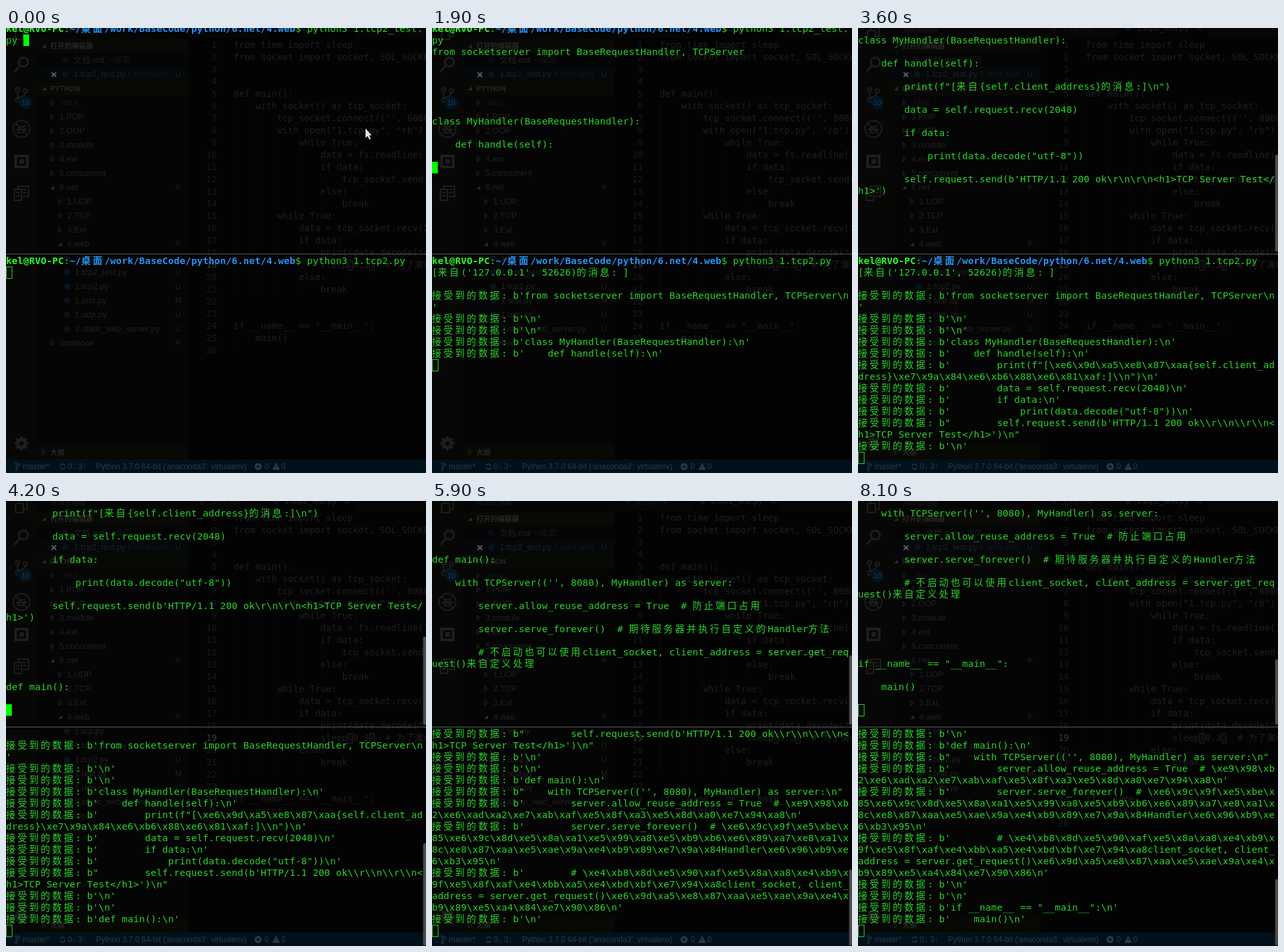
Animation, 653 px wide and 692 px high, one loop 8.4 s. Source, as an HTML page with a canvas:

```html
<!DOCTYPE html>
<html lang="zh">
<head>
<meta charset="utf-8">
<title>TCP server test</title>
<style>
html, body { margin: 0; width: 653px; height: 692px; overflow: hidden; background: #000; }
canvas { display: block; }
</style>
</head>
<body>
<canvas id="stage" width="653" height="692"></canvas>
<script>
const W = 653, H = 692, LOOP = 8400, COLS = 72, CELL = 9, LINE = 18;
const CJK = '"Noto Sans CJK SC", "Noto Sans CJK", sans-serif';
const MONO = '"DejaVu Sans Mono", ' + CJK;
const SANS = '"Liberation Sans", ' + CJK;
const SIZE = '14.67px ';  // 11pt
const GREEN = '#2ad42a', BRIGHT = '#28ff28', BLUE = '#2892f8';
const PROMPT = 'kel@RVO-PC:~/桌面/work/BaseCode/python/6.net/4.web$ ';

// Lines sent over the socket, and when each one shows up
const FILE = String.raw`from socketserver import BaseRequestHandler, TCPServer


class MyHandler(BaseRequestHandler):
    def handle(self):
        print(f"[来自{self.client_address}的消息:]\n")
        data = self.request.recv(2048)
        if data:
            print(data.decode("utf-8"))
        self.request.send(b'HTTP/1.1 200 ok\r\n\r\n<h1>TCP Server Test</h1>')


def main():
    with TCPServer(('', 8080), MyHandler) as server:
        server.allow_reuse_address = True  # 防止端口占用
        server.serve_forever()  # 期待服务器并执行自定义的Handler方法
        # 不启动也可以使用client_socket, client_address = server.get_request()来自定义处理


if __name__ == "__main__":
    main()`.split('\n');
const TIMES = [700, 800, 1200, 1400, 1900, 2300, 2400, 2600, 3200, 3400, 3600,
  3800, 4200, 4400, 4700, 5300, 5300, 5900, 6000, 6400, 6900];

// Scrollbar tops: [time, y]
const TOP_BAR = [[2900, 180], [3200, 186], [3400, 192], [3600, 197], [3800, 204], [4200, 211],
  [4400, 217], [4700, 223], [5300, 232], [5600, 240], [6200, 243], [6900, 246]];
const LOW_BAR = [[3900, 525], [4200, 532], [4400, 540], [4700, 548], [5300, 560], [5600, 573], [6200, 588]];

const CODE = `from time import sleep
from socket import socket, SOL_SOCKET


def main():
    with socket() as tcp_socket:
        tcp_socket.connect(('', 8080))
        with open("1.tcp.py", "rb") as fs:
            while True:
                data = fs.readline()
                if data:
                    tcp_socket.send(data)
                else:
                    break
        while True:
            data = tcp_socket.recv(2048)
            if data:
                print(data.decode("utf-8"))
                sleep(0.3)  # 为了演示
            else:
                break


if __name__ == "__main__":
    main()
`.split('\n');

const canvas = document.getElementById('stage');
const isWide = ch => /[\u2e80-\uffff]/.test(ch);

function wrap(text) {
  const rows = [''];
  let col = 0;
  for (const ch of text) {
    const w = isWide(ch) ? 2 : 1;
    if (col + w > COLS) { rows.push(''); col = 0; }
    rows[rows.length - 1] += ch;
    col += w;
  }
  return rows;
}

// Python's repr() of a line as bytes
function bytesRepr(line) {
  const quote = line.includes("'") && !line.includes('"') ? '"' : "'";
  const body = [...new TextEncoder().encode(line)].map(b =>
    b > 126 ? '\\x' + b.toString(16) : b === 92 ? '\\\\' : String.fromCharCode(b)).join('');
  return 'b' + quote + body + '\\n' + quote;
}

function drawRows(g, rows, top) {
  rows.forEach((row, r) => {
    const prompt = row.startsWith(PROMPT);
    let col = 0;
    for (const ch of row) {
      const wide = isWide(ch), user = prompt && col < 10, path = prompt && col > 10 && col < 50;
      g.font = (user || path ? 'bold ' : '') + SIZE + (wide ? CJK : MONO);
      g.fillStyle = user ? BRIGHT : path ? BLUE : GREEN;
      if (ch !== ' ') g.fillText(ch, col * CELL, top + r * LINE + 14);
      col += wide ? 2 : 1;
    }
  });
}

function drawCursor(g, x, y, solid) {
  if (solid) {
    g.fillStyle = '#00ff00';
    g.fillRect(x, y, CELL, LINE);
  } else {
    g.strokeStyle = GREEN;
    g.lineWidth = 1;
    g.strokeRect(x + .5, y + .5, CELL, LINE);
  }
}

function drawBar(g, keys, t, bottom) {
  const key = keys.filter(k => k[0] <= t).pop();
  if (!key) return;
  g.fillStyle = '#4c4c4c';
  g.beginPath();
  g.roundRect(648.5, key[1], 4.5, bottom - key[1], 2);
  g.fill();
}

// Dim editor window showing through the terminal
function makeBackdrop() {
  const layer = document.createElement('canvas');
  layer.width = W;
  layer.height = H;
  const g = layer.getContext('2d');
  const box = (c, x, y, w, h) => { g.fillStyle = c; g.fillRect(x, y, w, h); };
  const text = (s, x, y, c = '#212121', font = '13px ' + SANS) => {
    g.font = font;
    g.fillStyle = c;
    g.fillText(s, x, y);
  };
  const dot = (x, y, r, c) => { g.fillStyle = c; g.beginPath(); g.arc(x, y, r, 0, 7); g.fill(); };
  const line = (...p) => {
    g.beginPath();
    for (let i = 0; i < p.length; i += 2) g.lineTo(p[i], p[i + 1]);
    g.stroke();
  };
  const ring = (x, y, r) => { g.beginPath(); g.arc(x, y, r, 0, 7); g.stroke(); };
  const arrow = (x, y, open) => {
    g.beginPath();
    if (open) { g.moveTo(x + 3, y - 3); g.lineTo(x + 3, y + 3); g.lineTo(x - 3, y + 3); }
    else { g.moveTo(x - 2, y - 4); g.lineTo(x + 2.5, y); g.lineTo(x - 2, y + 4); }
    g.closePath();
    g.lineWidth = 1;
    g.strokeStyle = g.fillStyle = '#2a2a2a';
    open ? g.fill() : g.stroke();
  };

  box('#030303', 0, 0, W, H);
  box('#070705', 0, 0, 49, 671);
  box('#040504', 49, 0, 235, 671);
  box('#060606', 284, 0, W, 15);
  box('#030303', 404, 0, 140, 15);
  for (const y of [17, 83, 649]) box('#080804', 49, y, 235, 22);
  box('#04080a', 49, 61, 235, 22);
  box('#00111c', 0, 671, W, 21);

  // Activity bar
  const glyph = '#1e1e1c';
  g.strokeStyle = glyph;
  g.lineWidth = 2;
  g.strokeRect(15, 4, 12, 14);
  line(20, 3, 20, -2, 33, -2, 33, 13, 27, 13);
  g.lineWidth = 3;
  ring(27, 53, 7);
  line(22, 58, 13, 68);
  g.lineWidth = 2;
  ring(18, 96, 3); ring(30, 98, 3); ring(18, 112, 3);
  line(18, 99, 18, 109);
  line(30, 101, 28, 105, 18, 109);
  ring(24, 157, 13);
  ring(24, 158, 5);
  line(15, 148, 33, 166);
  line(15, 158, 33, 158);
  line(18, 164, 21, 161);
  line(27, 154, 30, 151);
  g.lineWidth = 4;
  g.strokeRect(15, 199, 18, 17);
  box(glyph, 21, 204, 7, 7);
  g.lineWidth = 2;
  g.strokeRect(13, 251, 11, 17);
  line(19, 250, 19, 246, 35, 246, 35, 262, 26, 262);
  line(16, 256, 21, 256);
  line(16, 261, 21, 261);
  line(26, 251, 32, 251);
  line(26, 256, 32, 256);
  dot(30, 116, 10.5, '#001422');
  text('10', 24, 120, '#2a3a46', '11px ' + SANS);
  g.lineWidth = 5;
  ring(24, 646, 6);
  g.lineWidth = 4;
  for (let i = 0; i < 8; i++) {
    const c = Math.cos(i * Math.PI / 4), s = Math.sin(i * Math.PI / 4);
    line(24 + 7 * c, 646 + 7 * s, 24 + 11 * c, 646 + 11 * s);
  }

  // Sidebar
  const head = 'bold 11px ' + SANS, small = '12px ' + SANS, icon = '#08131d';
  text('资源管理器', 69, 6, '#1a1a1a', '11px ' + SANS);
  [['打开的编辑器', 28, 1], ['PYTHON', 94, 1], ['大纲', 660, 0]].forEach(([s, y, open]) => {
    arrow(59, y, open);
    text(s, 69, y + 4, '#272727', head);
  });
  text('文档.md', 105, 54);
  text('~/桌面', 159, 54, '#161616', small);
  text('1.tcp2_test.py', 105, 76);
  text('6.net/4.web', 189, 76, '#161616', small);
  text('U', 263, 76, '#162016', small);
  dot(92, 49, 4.5, '#0c0c18');
  dot(92, 72, 5, icon);
  g.strokeStyle = '#606060';
  g.lineWidth = 2;
  line(71, 69, 78, 76);
  line(78, 69, 71, 76);

  const tree = ['.idea', '1.POP', '2.OOP', '3.module', '4.ext', '5.concurrent', '6.net',
    ' 1.UDP', ' 2.TCP', ' 3.Ext', ' 4.web', '  1.tcp.py', '  1.tcp2_test.py U', '  1.tcp2.py U',
    '  1.test.py M', '  1.udp.py U', '  2.static_web_server.py U', 'notebook'];
  tree.forEach((item, i) => {
    const y = 116 + 22 * i, [name, mark] = item.trim().split(' ');
    const depth = item.search(/\S/), x = 83 + 12 * depth;
    if (depth < 2) arrow(x - 11, y, /6\.net|4\.web/.test(name));
    else dot(x - 12, y, 5, icon);
    text(name, x, y + 4, i ? '#212121' : '#151515');
    if (mark) text(mark, 263, y + 4, mark === 'M' ? '#242116' : '#162016', small);
    if (/6\.net|4\.web|notebook/.test(name)) dot(267, y - 1, 4, '#0d120d');
  });

  // Editor
  text('文档.md', 316, 4, '#171717');
  text('1.tcp2_test.py', 433, 4, '#232323');
  dot(304, 0, 4.5, '#0c0c18');
  dot(420, 0, 5, icon);
  g.strokeStyle = '#2a2a2a';
  line(527, -3, 534, 4);
  line(534, -3, 527, 4);
  const mono = '14px ' + MONO;
  CODE.forEach((row, i) => {
    const y = 31 + 19 * i, n = String(i + 1);
    const depth = Math.floor(row.search(/\S/) / 4);
    for (let d = 0; d < depth; d++) box('#080808', Math.round(354 + d * 33.7), y - 14, 1, 19);
    text(n, 328 - 8.43 * n.length, y, n === '19' ? '#3a3a3a' : '#191919', mono);
    text(row, 354, y, '#1f1f1f', mono);
  });
  g.lineWidth = 1;
  g.strokeStyle = '#242424';
  g.strokeRect(531.5, 361.5, 7, 15);
  g.strokeRect(565.5, 361.5, 7, 15);

  // Status bar
  const status = '#2c3a44';
  g.strokeStyle = status;
  ring(16, 677, 1.5); ring(20, 679, 1.5); ring(16, 687, 1.5);
  line(16, 679, 16, 685);
  line(20, 681, 16, 685);
  g.lineWidth = 1.5;
  g.beginPath(); g.arc(88, 682, 4, .3, 2.8); g.stroke();
  g.beginPath(); g.arc(88, 682, 4, 3.4, 6); g.stroke();
  text('master*', 26, 686, status, small);
  text('0↓ 3↑', 96, 686, status, small);
  text("Python 3.7.0 64-bit ('anaconda3': virtualenv)", 140, 686, status, small);
  dot(392, 682, 5.5, status);
  g.strokeStyle = '#00111c';
  line(390, 680, 394, 684);
  line(394, 680, 390, 684);
  text('0', 402, 686, status, small);
  g.beginPath();
  g.moveTo(420, 676); g.lineTo(426, 687); g.lineTo(414, 687);
  g.fill();
  box('#00111c', 419.5, 680, 1, 4);
  text('0', 428, 686, status, small);
  return layer;
}

function drawPointer(g) {
  g.beginPath();
  [[559, 156], [559, 171], [562, 168], [565, 173.5], [567, 172.5], [564.5, 167], [568.5, 167]]
    .forEach(p => g.lineTo(...p));
  g.closePath();
  g.fillStyle = '#e4e4e4';
  g.fill();
}

const ctx = canvas.getContext('2d');
const backdrop = makeBackdrop();

function draw(t) {
  const sent = FILE.slice(0, TIMES.filter(s => s <= t).length);
  const upper = [...wrap(PROMPT + 'python3 1.tcp2_test.py '), ...sent.flatMap(s => [...wrap(s), ''])];
  const lower = [PROMPT + 'python3 1.tcp2.py'];
  if (sent.length) lower.push("[来自('127.0.0.1', 52626)的消息: ]", '');
  lower.push(...sent.flatMap(s => wrap('接受到的数据: ' + bytesRepr(s))));

  ctx.drawImage(backdrop, 0, 0);
  ctx.fillStyle = '#5a5a5a';
  ctx.fillRect(0, 351, W, 1);

  const upSkip = Math.max(0, upper.length - 18), lowSkip = Math.max(0, lower.length - 17);
  drawRows(ctx, upper.slice(upSkip), -8);
  drawRows(ctx, lower.slice(lowSkip), 353);

  const running = sent.length > 0, row = running ? upper.length - upSkip : 1;
  const lit = !running || (t - 500) % 1200 < 600;
  if (lit || t >= 8100) drawCursor(ctx, running ? 0 : 27, row * LINE - 8, t < 8100);
  drawCursor(ctx, 0, 353 + (lower.length - lowSkip) * LINE, false);

  drawBar(ctx, TOP_BAR, t, 348);
  drawBar(ctx, LOW_BAR, t, 691);
  if (t < 300) drawPointer(ctx);
}

function tick() {
  draw(performance.now() % LOOP);
  requestAnimationFrame(tick);
}
tick();
</script>
</body>
</html>
```
